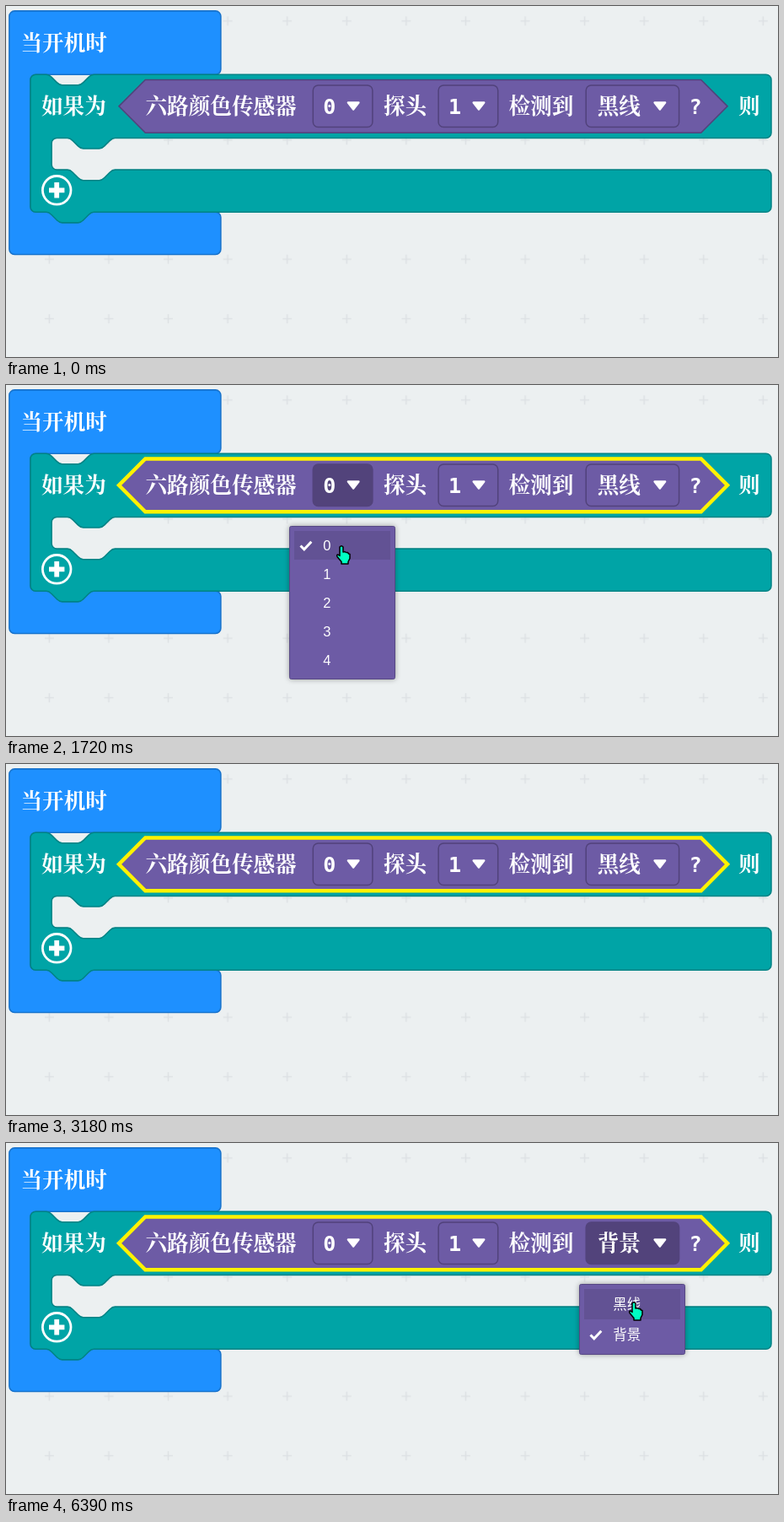
An HTML page that plays this animation: 916x416 px, repeating every 6.51 s.

```html
<!DOCTYPE html>
<html lang="zh">
<head>
<meta charset="utf-8">
<title>Block editor dropdowns</title>
<style>
  html, body { margin: 0; width: 100%; height: 100%; overflow: hidden; background: #ecf0f1; }
  svg { display: block; }
  .label { font: 700 25.6px "Noto Serif CJK SC", "Noto Sans CJK SC", "Noto Sans CJK", serif; fill: #fff; }
  .code { font: 700 25.1px "DejaVu Sans Mono", "Noto Sans Mono", monospace; fill: #fff; }
  .item { font: 16.5px "Liberation Sans", "Noto Sans CJK SC", "Noto Sans CJK", sans-serif; fill: #fff; }
  .block { stroke-width: 1; }
  .field rect { fill: #6d5ba5; stroke: #51427b; stroke-width: 1.5; }
  .field.open rect { fill: #52437b; stroke: #52437b; }
  .menu { filter: drop-shadow(0 0 3px rgba(0, 0, 0, .35)); }
  .panel { fill: #6d5ba5; stroke: #574884; }
  .hover { fill: #625294; }
  .tick { fill: none; stroke: #fff; stroke-width: 3; }
</style>
</head>
<body>
<svg id="stage" width="916" height="416" viewBox="0 0 916 416">
  <defs>
    <pattern id="grid" x="16.1" y="-17.5" width="70.58" height="70.58" patternUnits="userSpaceOnUse">
      <path d="M29.8 35.3h11M35.3 29.8v11" stroke="#dde1e4" stroke-width="1.6"/>
    </pattern>
  </defs>
  <rect width="916" height="416" fill="url(#grid)"/>
  <g transform="translate(3.9 5.9) scale(1.5685)">
    <path id="hat" class="block" fill="#1e90ff" stroke="#1873cc"/>
    <path id="branch" class="block" fill="#00a4a6" stroke="#008385"/>
    <path class="block" fill="#6d5ba5" stroke="#51427b" d="M82.9 72l20-20h420.4l20 20l-20 20h-420.4z"/>
    <path id="glow" fill="none" stroke="#fff200" stroke-width="2.8" d="M82.9 72l20-20h420.4l20 20l-20 20h-420.4z"/>
  </g>
  <g class="label">
    <text x="17.5" y="52.5">当开机时</text>
    <text x="42" y="127.5">如果为</text>
    <text x="165.5" y="127.5">六路颜色传感器</text>
    <text x="448" y="127.5">探头</text>
    <text x="596.5" y="127.5">检测到</text>
    <text x="869" y="127.5">则</text>
  </g>
  <text class="code" x="810.5" y="127.5">?</text>
  <circle cx="60.2" cy="218.3" r="16.8" fill="none" stroke="#fff" stroke-width="2.8"/>
  <path d="M51 218.3h18.4M60.2 209.1v18.4" stroke="#fff" stroke-width="5.8"/>
  <g id="fields"></g>
  <g id="menus"></g>
  <path id="hand" fill="#00ffc3" stroke="#000" stroke-width="1.5" stroke-linejoin="round"
    d="M-2 2q2-2.500 4 0v6l2-.5 1.500 1h2l1 1.500 1.500.5v5l-2 4v2.500h-8v-2.500l-5-6q-1-2.500 1-2.500l2 1.500z"/>
</svg>
<script>
const LOOP = 6510, GLOW_AT = 600, RELABEL_AT = 4030;
const $ = id => document.getElementById(id);

function add(parent, tag, attrs, text) {
  const node = document.createElementNS('http://www.w3.org/2000/svg', tag);
  for (const key in attrs) node.setAttribute(key, attrs[key]);
  if (text !== undefined) node.textContent = text;
  return parent.appendChild(node);
}

// Block outlines, in workspace units
const notch = 'c2 0 3 1 4 2l4 4c1 1 2 2 4 2h12c2 0 3-1 4-2l4-4c1-1 2-2 4-2';
const notchBack = 'c-2 0-3 1-4 2l-4 4c-1 1-2 2-4 2h-12c-2 0-3-1-4-2l-4-4c-1-1-2-2-4-2';
const right = h => `a4 4 0 0 1 4 4v${h - 8}a4 4 0 0 1-4 4`;
$('hat').setAttribute('d', `M4 0H156${right(48)}H20a4 4 0 0 0-4 4v96a4 4 0 0 0 4 4H156${right(32)}H4a4 4 0 0 1-4-4V4a4 4 0 0 1 4-4z`);
$('branch').setAttribute('d', `M20 48h8${notch}H572.4${right(48)}H80${notchBack}h-8a4 4 0 0 0-4 4v16a4 4 0 0 0 4 4h8${notch}H572.4${right(32)}H64${notchBack}h-8a4 4 0 0 1-4-4V52a4 4 0 0 1 4-4z`);

function makeField(x, width, label, cls) {
  const group = add($('fields'), 'g', { class: 'field' });
  add(group, 'rect', { x, y: 93.9, width, height: 49.6, rx: 6 });
  const text = add(group, 'text', { class: cls, x: x + (cls === 'code' ? 12 : 13.5), y: 127.5 }, label);
  add(group, 'path', {
    d: `M${x + width - 29} 114.500h12.500l-6.250 8z`,
    fill: '#fff', stroke: '#fff', 'stroke-width': 2.5, 'stroke-linejoin': 'round'
  });
  return { group, text };
}

function makeMenu(x, labels, rowHeight) {
  const group = add($('menus'), 'g', { class: 'menu' });
  add(group, 'rect', { class: 'panel', x: x + .5, y: 167.5, width: 125, height: labels.length * rowHeight + 11, rx: 2 });
  const hover = add(group, 'rect', { class: 'hover', x: x + 6, width: 114, height: rowHeight });
  labels.forEach((label, i) =>
    add(group, 'text', { class: 'item', x: x + 40.3, y: 173 + (i + .5) * rowHeight + 6 }, label));
  const tick = add(group, 'path', { class: 'tick', d: `M${x + 13.5} 0l4.300 4.300 8.500-9` });
  return { group, hover, tick, rowHeight, count: labels.length };
}

const fields = [
  makeField(364.3, 70.6, '0', 'code'),
  makeField(513.1, 70.6, '1', 'code'),
  makeField(688.2, 110.4, '黑线', 'label')
];
const menus = [
  makeMenu(336, [0, 1, 2, 3, 4], 34),
  makeMenu(485, [1, 2, 3, 4, 5, 6], 34),
  makeMenu(680, ['黑线', '背景'], 36)
];

// Each visit opens one menu; path points are [time, x, y] of the fingertip
const visits = [
  { menu: 0, open: 680, close: 2050, path: [[1120, 404, 163], [1160, 404, 220], [1200, 406, 290], [1240, 407, 329],
    [1320, 408, 338], [1440, 405, 300], [1600, 400, 230], [1680, 398, 196], [1720, 398, 190]] },
  { menu: 1, open: 2130, close: 3180, path: [[2210, 560, 186], [2250, 559, 207], [2450, 557, 365], [2530, 556, 391],
    [2690, 553, 320], [2810, 550, 185]] },
  { menu: 2, open: 3300, close: 4030, path: [[3870, 745, 200], [3990, 745, 226]] },
  { menu: 2, open: 4360, close: 5090, path: [[4680, 744, 180], [4840, 745, 226]] },
  { menu: 2, open: 5990, close: LOOP, path: [[6270, 742, 170], [6350, 744, 184], [6390, 745, 188]] }
];
const strolls = [
  { close: 600, path: [[40, 470, 393], [320, 440, 280], [600, 405, 160]] },
  { close: 5700, path: [[5460, 564, 256], [5580, 630, 215], [5700, 709, 162]] }
];

const step = (t, from) => from + Math.floor((t - from) / 40 + 1e-6) * 40;

function pointAt(path, t) {
  const next = path.findIndex(p => p[0] > t);
  if (next < 0) return path[path.length - 1];
  if (next === 0) return path[0];
  const a = path[next - 1], b = path[next], k = (t - a[0]) / (b[0] - a[0]);
  return a.map((v, i) => v + (b[i] - v) * k);
}

// cubic-bezier(.25, .1, .25, 1)
function ease(x) {
  if (x >= 1) return 1;
  const bezier = (a, b, u) => 3 * a * u * (1 - u) ** 2 + 3 * b * u * u * (1 - u) + u ** 3;
  let lo = 0, hi = 1;
  for (let i = 0; i < 20; i++) {
    const mid = (lo + hi) / 2;
    if (bezier(.25, .25, mid) < x) lo = mid; else hi = mid;
  }
  return bezier(.1, 1, lo);
}

function showMenu(visit, t, selected) {
  const { group, hover, tick, rowHeight, count } = menus[visit.menu];
  const { path } = visit;
  const shown = ease((step(t, visit.open) - visit.open + 18) / 250);
  group.style.display = '';
  group.style.opacity = shown;
  group.setAttribute('transform', `translate(0 ${-26 * (1 - shown)})`);

  // The highlighted row trails the pointer by one step
  const seen = Math.min(step(t, path[0][0]), path[path.length - 1][0]) - 40;
  let row = selected;
  if (seen >= path[0][0]) {
    const under = Math.floor((pointAt(path, seen)[2] - 173) / rowHeight);
    row = Math.max(0, Math.min(count - 1, under));
  }
  hover.setAttribute('y', 173 + row * rowHeight);
  tick.setAttribute('transform', `translate(0 ${173.500 + (selected + .5) * rowHeight})`);
}

function render(t) {
  const relabelled = t >= RELABEL_AT;
  const visit = visits.find(v => t >= v.open && t < v.close);
  $('glow').style.display = t >= GLOW_AT ? '' : 'none';
  fields[2].text.textContent = relabelled ? '背景' : '黑线';
  fields.forEach((f, i) => f.group.classList.toggle('open', !!visit && visit.menu === i));
  menus.forEach(m => { m.group.style.display = 'none'; });
  if (visit) showMenu(visit, t, visit.menu === 2 && relabelled ? 1 : 0);

  const move = [...visits, ...strolls].find(m => t >= m.path[0][0] && t < m.close);
  $('hand').style.display = move ? '' : 'none';
  if (move) {
    const [, x, y] = pointAt(move.path, step(t, move.path[0][0]));
    $('hand').setAttribute('transform', `translate(${x} ${y})`);
  }
}

const start = performance.now();
function tickFrame() {
  render((performance.now() - start) % LOOP);
  requestAnimationFrame(tickFrame);
}
tickFrame();
</script>
</body>
</html>
```
